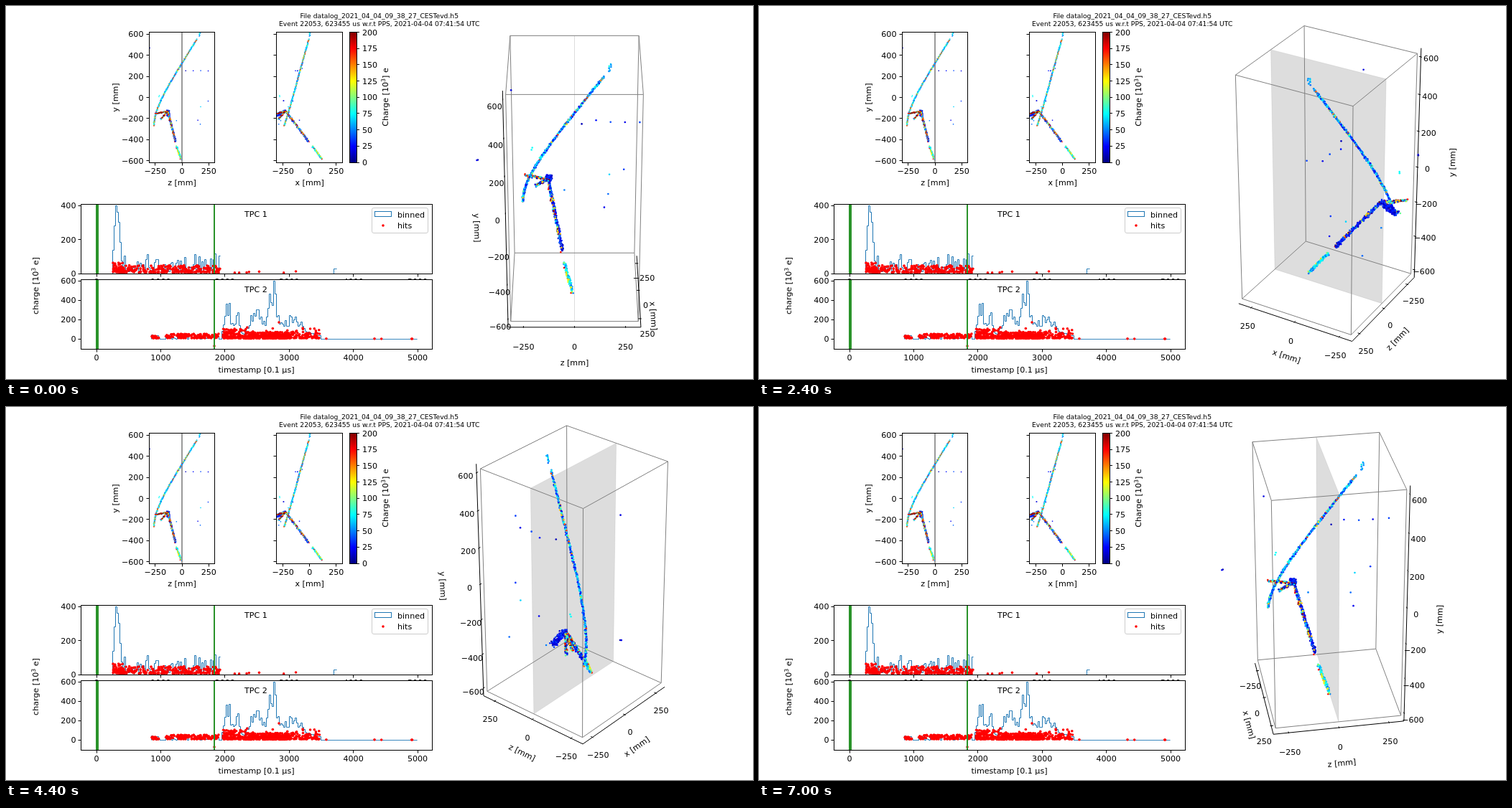
Recreate the animation shown at these times as an HTML page with a canvas. Size 1040x520 px, loop 7200 ms.

```html
<!DOCTYPE html>
<html lang="en">
<head>
<meta charset="utf-8">
<title>Event display</title>
<style>
  html, body { margin: 0; width: 100%; height: 100%; overflow: hidden; background: #fff; }
  canvas, svg { position: absolute; left: 0; top: 0; width: 1040px; height: 520px; }
  text { font: 11.1px "DejaVu Sans", Verdana, sans-serif; fill: #000; }
  .title text { font-size: 9.2px; }
  .sup { font-size: 7.8px; }
</style>
</head>
<body>
<canvas id="plots" width="1040" height="520"></canvas>
<canvas id="scene" width="1040" height="520"></canvas>
<svg viewBox="0 0 1040 520">
  <clipPath id="cut"><rect x="60" y="360" width="560" height="21"/></clipPath>
  <g class="title" text-anchor="middle">
    <text x="519.7" y="17">File datalog_2021_04_04_09_38_27_CESTevd.h5</text>
    <text x="519.7" y="28">Event 22053, 623455 us w.r.t PPS, 2021-04-04 07:41:54 UTC</text>
  </g>
  <g id="labels"></g>
  <g clip-path="url(#cut)"><g id="hidden"></g></g>
  <g id="axes3d"></g>
</svg>
<script>
const $ = id => document.getElementById(id);
const bg = $('plots').getContext('2d');
const g = $('scene').getContext('2d');
const BLUE = '#1f77b4', GREEN = '#2a932a', RED = '#f00', GRAY = '#808080';

let seed = 7;
const rnd = () => {
  seed = (seed * 1664525 + 1013904223) % 4294967296;
  return seed / 4294967296;
};
const between = (a, b) => a + (b - a) * rnd();
const jitter = s => (rnd() + rnd() - 1) * s;
const clamp = v => Math.max(0, Math.min(1, v));
const range = (a, b, by) => Array.from({ length: (b - a) / by + 1 }, (_, i) => a + i * by);
const snap = v => Math.floor(v) + .5;

function jet(q) {
  const t = clamp(q / 200);
  const ch = c => Math.round(255 * clamp(1.5 - Math.abs(4 * t - c)));
  return `rgb(${ch(3)},${ch(2)},${ch(1)})`;
}

// "^" raises the next character; y is the middle of the digits
function addText(parent, str, x = 0, y = 0, anchor = 'middle', angle = 0) {
  const el = document.createElementNS('http://www.w3.org/2000/svg', 'text');
  const span = (s, dy, cls) => {
    const t = document.createElementNS(el.namespaceURI, 'tspan');
    t.setAttribute('dy', dy);
    t.setAttribute('class', cls);
    t.textContent = s;
    el.append(t);
  };
  const [head, tail] = str.split('^');
  el.append(head);
  if (tail) {
    span(tail[0], -4, 'sup');
    span(tail.slice(1), 4, '');
  }
  el.setAttribute('text-anchor', anchor);
  place(el, x, y, angle);
  parent.append(el);
  return el;
}
function place(el, x, y, angle = 0) {
  el.setAttribute('transform', `translate(${x.toFixed(2)} ${y.toFixed(2)}) rotate(${angle.toFixed(2)}) translate(0 4)`);
}
const num = v => String(v).replace('-', '\u2212');

function line(c, x0, y0, x1, y1, color = '#000', w = 1) {
  c.strokeStyle = color;
  c.lineWidth = w;
  c.beginPath();
  c.moveTo(x0, y0);
  c.lineTo(x1, y1);
  c.stroke();
}
function dot(c, x, y, r, color) {
  c.fillStyle = color;
  c.beginPath();
  c.arc(x, y, r, 0, 7);
  c.fill();
}
function frame(x0, y0, x1, y1) {
  bg.strokeStyle = '#000';
  bg.lineWidth = 1;
  bg.strokeRect(x0, y0, x1 - x0, y1 - y0);
}

// Hits are [x, y, z, charge], strewn along Bezier curves
const mix = (a, b, t) => a.map((v, k) => v + (b[k] - v) * t);
const bezier = (pts, t) =>
  pts.length === 1 ? pts[0] : bezier(pts.slice(1).map((p, i) => mix(pts[i], p, t)), t);

const hits = [];
function track(n, spread, charge, ...pts) {
  for (let i = 0; i < n; i++) {
    const off = [0, 0, 0].map(() => jitter(spread));
    const side = clamp((off[0] - off[2]) / spread);
    hits.push([...bezier(pts, i / n).map((v, k) => v + off[k]), charge(side)]);
  }
}
const soft = () => rnd() < .12 ? between(80, 170) : between(18, 83);
const mixed = side => rnd() < .12 + .6 * side ? between(50, 210) : between(10, 50);
const hot = side => between(40, 80) + 170 * side * rnd();
const wild = () => 8 + 210 * rnd() ** 1.2;
const low = () => between(8, 40);
const vertex = [-225, -130, -132];

track(9, 9, () => between(40, 80), [3, 612, 172], [1, 586, 156]);
track(400, 5, soft, [-7, 552, 138], [-94, 250, -40], [-169, -60, -262], [-240, -270, -262]);
track(260, 9, mixed, vertex, [-10, -418, -61]);
track(90, 8, hot, [28, -463, -52], [114, -583, -10]);
track(70, 8, wild, vertex, [-310, -156, -252]);
track(60, 8, wild, vertex, [-294, -207, -198]);
track(140, 18, low, vertex, [-310, -167, -130]);

// Stray hits
track(2, 5, low, [-240, -28, -490], [-246, -33, -480]);
track(2, 4, () => 76, [-280, 18, -215], [-284, -8, -212]);
track(1, 3, low, [-30, 472, -300]);
for (let i = 0; i < 5; i++)
  hits.push([between(-136, -70), between(150, 325), 35 + 70 * i, low()]);
for (let i = 0; i < 5; i++)
  hits.push([between(-290, 80), between(-340, 0), between(-130, 290), low() * 2]);

function drawProjections() {
  const labels = $('labels');
  const py = y => 127.5 - y / 6.8;
  const byCharge = [...hits].sort((a, b) => a[3] - b[3]);
  const panel = (x0, x1, mid, scale, axis, name) => {
    bg.save();
    bg.beginPath();
    bg.rect(x0, 36.5, x1 - x0, 182);
    bg.clip();
    if (name === 'z') line(bg, mid, 36, mid, 218, GRAY, 1.6);
    for (const h of byCharge) {
      bg.fillStyle = jet(h[3]);
      bg.fillRect(mid + h[axis] / scale - .7, py(h[1]) - .7, 1.4, 1.4);
    }
    bg.restore();
    frame(x0, 36.5, x1, 218.5);
    for (const v of range(-600, 600, 200)) {
      const y = snap(py(v));
      line(bg, x0 - 4, y, x0, y);
      if (name === 'z') addText(labels, num(v), 191.5, py(v), 'end');
    }
    for (const v of range(-250, 250, 250)) {
      const x = mid + v / scale;
      line(bg, snap(x), 218.5, snap(x), 222.5);
      addText(labels, num(v), x, 230);
    }
    addText(labels, name + ' [mm]', mid, 246);
  };
  panel(199.5, 290.5, 245, 6.71, 2, 'z');
  panel(376.5, 468.5, 422.7, 6.75, 0, 'x');
  addText(labels, 'y [mm]', 151.5, 127.5, 'middle', -90);

  for (let y = 36; y < 218; y++) {
    bg.fillStyle = jet(200 * (218 - y) / 182);
    bg.fillRect(478, y, 10, 1);
  }
  frame(478.5, 36.5, 488.5, 218.5);
  for (const q of range(0, 200, 25)) {
    const y = 218 - q * .9075;
    line(bg, 488, snap(y), 492, snap(y));
    addText(labels, num(q), 496, y, 'start');
  }
  addText(labels, 'Charge [10^3] e', 528, 127, 'middle', -90);
}

function steps(x0, x1, base, height) {
  bg.strokeStyle = BLUE;
  bg.lineWidth = 1;
  bg.beginPath();
  bg.moveTo(x0 + .5, base);
  for (let x = x0 + .5; x < x1; x += 2) {
    const y = snap(base - height(x));
    bg.lineTo(x, y);
    bg.lineTo(x + 2, y);
  }
  bg.stroke();
}
const hump = (x, mid, width, height) => height * Math.exp(-(((x - mid) / width) ** 2));

// red hits, piled up near the base line
function pile(n, x0, x1, base, height, power = 2) {
  for (let i = 0; i < n; i++)
    dot(bg, between(x0, x1), base - height * rnd() ** power, 1.8, RED);
}

function drawTimes() {
  const labels = $('labels');
  const tx = t => 126 + t * .0894;
  const axes = (y0, base, unit, top, name, parent, labelY) => {
    const y1 = y0 + 97;
    line(bg, 127, y0, 127, y1, GREEN, 4);
    line(bg, 290, y0, 290, y1, GREEN, 2);
    frame(104.5, y0, 593.5, y1);
    for (const v of range(0, top, 200)) {
      const y = base - v * unit;
      line(bg, 100.5, snap(y), 104.5, snap(y));
      addText(labels, num(v), 97.5, y, 'end');
    }
    for (const t of range(0, 5000, 1000)) {
      line(bg, snap(tx(t)), y1, snap(tx(t)), y1 + 4);
      addText(parent, num(t), tx(t), labelY);
    }
    addText(labels, name, 348, y0 + 13.5);
  };

  steps(148, 298, 373.5, x => hump(x, 153.5, 4, 86) + 3 + 25 * rnd() ** 2);
  steps(456, 460, 373.5, () => 7);
  pile(45, 148, 165, 371, 13, 1.5);
  pile(280, 150, 298, 371.5, 10, 1.7);
  pile(7, 315, 475, 372, 2);
  axes(276.5, 373, .2375, 400, 'TPC 1', $('hidden'), 384);

  bg.fillStyle = '#fff';
  bg.fillRect(104, 381, 490, 98);
  steps(202, 572, 464.5, x => {
    const tall = hump(x, 308, 6, 50) + hump(x, 321, 4, 42) + hump(x, 347, 11, 42)
      + hump(x, 370, 8, 72) + hump(x, 398, 20, 30);
    const noise = x < 214 || x > 222 && x < 298 ? 7 * rnd() ** 2 : 0;
    return noise + (x > 299 && x < 437 ? 4 + tall * between(.5, 1.12) : 0);
  });
  pile(26, 203, 213, 463, 3);
  pile(130, 222, 296, 463, 6, 1.4);
  pile(100, 302, 328, 463, 13);
  pile(280, 331, 396, 463.5, 9, 1.6);
  pile(100, 302, 437, 463, 15, 2.4);
  pile(60, 396, 436, 463, 8);
  pile(5, 440, 572, 464, 2);
  dot(bg, 380, 441, 1.8, RED);
  dot(bg, 290, 474, 1.8, RED);
  axes(381.5, 464, .1342, 600, 'TPC 2', labels, 490);

  addText(labels, 'timestamp [0.1 \u00b5s]', 348.5, 507);
  addText(labels, 'charge [10^3 e]', 41, 390, 'middle', -90);

  bg.beginPath();
  bg.roundRect(509.5, 281.5, 78, 35, 2.5);
  bg.fillStyle = 'rgba(255,255,255,.8)';
  bg.fill();
  bg.strokeStyle = '#ccc';
  bg.stroke();
  bg.strokeStyle = BLUE;
  bg.strokeRect(513.5, 286.5, 23, 7);
  dot(bg, 525, 306, 1.8, RED);
  addText(labels, 'binned', 545, 290.5, 'start');
  addText(labels, 'hits', 545, 306, 'start');
}

// Rotating view; u, v, h are fractions of the half box along x, z, y
const SIZE = 89.2, HALF = .0373, ELEV = Math.PI / 6, EDGE = 25 / 24;
function camera(az) {
  const c = Math.cos(az), s = Math.sin(az), ce = Math.cos(ELEV), se = Math.sin(ELEV);
  return (u, v, h) => {
    const toward = c * u + s * v;
    const k = SIZE / (1 - HALF * (ce * toward + se * 2 * h));
    return [791.5 + k * (c * v - s * u), 241.5 - k * (2 * ce * h - se * toward)];
  };
}

const axes = [
  { name: 'x', lim: 310, ticks: range(-250, 250, 250), pad: 1.293,
    at: (t, k, cu, cv) => [t, cv * k, -k], tick: (d, cu, cv) => [0, cv * d, 0] },
  { name: 'z', lim: 312, ticks: range(-250, 250, 250), pad: 1.293,
    at: (t, k, cu, cv) => [cu * k, t, -k], tick: (d, cu) => [cu * d, 0, 0] },
  { name: 'y', lim: 620, ticks: range(-600, 600, 200), pad: 1.45,
    at: (t, k, cu, cv) => [cu * k, -cv * k, t], tick: (d, cu) => [cu * d, 0, 0] }
];
for (const a of axes) {
  a.texts = a.ticks.map(v => addText($('axes3d'), num(v)));
  a.title = addText($('axes3d'), a.name + ' [mm]');
}

function drawAxis(a, P, cu, cv) {
  const p0 = P(...a.at(-EDGE, EDGE, cu, cv)), p1 = P(...a.at(EDGE, EDGE, cu, cv));
  line(g, ...p0, ...p1);
  a.ticks.forEach((v, i) => {
    const t = v / a.lim;
    const base = a.at(t, EDGE, cu, cv);
    const end = d => P(...a.tick(d, cu, cv).map((o, k) => base[k] + o));
    line(g, ...end(.0167), ...end(-.0333));
    const [x, y] = P(...a.at(t, 1.157, cu, cv));
    place(a.texts[i], x, y + 4);
  });
  // keep the title upright along its axis
  let deg = Math.atan2(p0[1] - p1[1], p1[0] - p0[0]) * 180 / Math.PI;
  deg = (deg + 360) % 180;
  if (deg > 90) deg -= 180;
  place(a.title, ...P(...a.at(0, a.pad, cu, cv)), -deg);
}

function drawScene(az) {
  const P = camera(az), c = Math.cos(az), s = Math.sin(az);
  g.clearRect(0, 0, 1040, 520);

  g.beginPath();
  for (const [u, h] of [[-1, -1], [1, -1], [1, 1], [-1, 1]]) g.lineTo(...P(u, 0, h));
  g.closePath();
  g.fillStyle = 'rgba(128,128,128,.27)';
  g.fill();
  g.strokeStyle = 'rgba(128,128,128,.15)';
  g.lineWidth = 1;
  g.stroke();

  for (const a of [-1, 1]) for (const b of [-1, 1]) {
    line(g, ...P(-1, a, b), ...P(1, a, b), GRAY);
    line(g, ...P(a, -1, b), ...P(a, 1, b), GRAY);
    line(g, ...P(a, b, -1), ...P(a, b, 1), GRAY);
  }
  for (const a of axes) drawAxis(a, P, c < 0 ? -1 : 1, s < 0 ? -1 : 1);

  const depth = ([x, y, z]) => c * x + s * z + Math.tan(ELEV) * y;
  for (const [x, y, z, q] of [...hits].sort((a, b) => depth(a) - depth(b)))
    dot(g, ...P(x / 310, z / 312, y / 620), 1.3, jet(q));
}

drawProjections();
drawTimes();

const start = performance.now();
let shown = -1;
function tick() {
  const step = Math.floor((performance.now() - start) % 7200 / 200);
  if (step !== shown) {
    shown = step;
    drawScene(step * Math.PI / 18);
  }
  requestAnimationFrame(tick);
}
tick();
</script>
</body>
</html>
```
